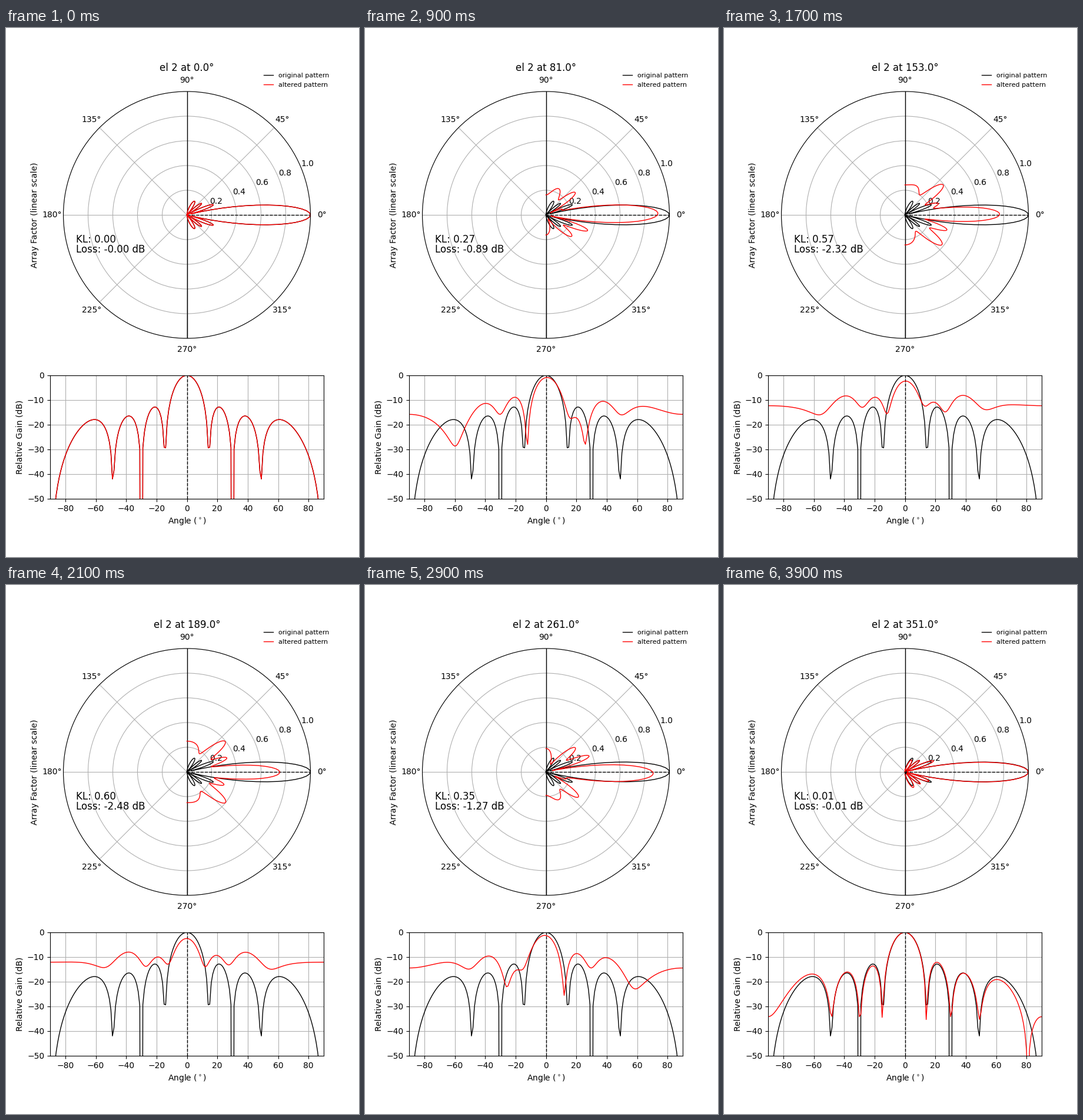
These frames come from a looping animation (600 by 900 pixels, 4 s). A matplotlib script:

```python
import matplotlib.pyplot as plt
import numpy as np
from matplotlib.animation import FuncAnimation

FRAMES = 40
INTERVAL = 100
ELEMENTS = 8
SHIFTED = 2

degrees = np.arange(-90, 91)
theta = np.radians(degrees)


def array_factor(phase):
    """Normalised magnitude of a half-wavelength line array with one shifted element."""
    n = np.arange(ELEMENTS)
    weights = np.ones(ELEMENTS, dtype=complex)
    weights[SHIFTED] = np.exp(1j * phase)
    steering = np.exp(1j * np.pi * np.outer(np.sin(theta), n))
    return np.maximum(np.abs(steering @ weights) / ELEMENTS, 1e-16)


def to_db(magnitude):
    return 20 * np.log10(magnitude)


def divergence(a, b):
    """Kullback-Leibler divergence of two power patterns."""
    p = a**2 / np.sum(a**2)
    q = b**2 / np.sum(b**2)
    return abs(np.sum(p * np.log(p / q)))


base = array_factor(0)

fig = plt.figure(figsize=(6, 9), dpi=100)
grid = fig.add_gridspec(2, 1, height_ratios=[2, 1])
polar = fig.add_subplot(grid[0], projection="polar")
gain = fig.add_subplot(grid[1])

# Polar pattern
for angle, style in ((np.pi / 2, "-"), (-np.pi / 2, "-"), (0, "--")):
    polar.plot([angle, angle], [0, 1], color="black", ls=style, lw=1)
polar_base, = polar.plot(theta, base, color="black", lw=1, label="original pattern")
polar_alt, = polar.plot(theta, base, color="red", lw=1, label="altered pattern")
polar.set_rlim(0, 1)
polar.set_rticks([0.2, 0.4, 0.6, 0.8, 1.0])
polar.set_ylabel("Array Factor (linear scale)", labelpad=30)
polar.legend(handles=[polar_base, polar_alt], loc="upper right",
             bbox_to_anchor=(1.1, 1.1), fontsize=8, handlelength=1.5,
             frameon=False)
title = polar.set_title("")
kl_text = polar.text(0.05, 0.388, "", fontsize=12, transform=polar.transAxes)
loss_text = polar.text(0.05, 0.348, "", fontsize=12, transform=polar.transAxes)

# Gain in decibels
gain.axvline(0, color="black", ls="--", lw=1)
gain.plot(degrees, to_db(base), color="black", lw=1)
gain_alt, = gain.plot(degrees, to_db(base), color="red", lw=1)
gain.set_xlim(-90, 90)
gain.set_ylim(-50, 0)
gain.set_xticks(range(-80, 81, 20))
gain.set_yticks(range(-50, 1, 10))
gain.grid(True)
gain.set_xlabel(r"Angle ($^\circ$)")
gain.set_ylabel("Relative Gain (dB)")


def update(frame):
    phase = frame * 360 / FRAMES
    altered = array_factor(np.radians(phase))
    loss = abs(to_db(altered[degrees == 0][0]))
    polar_alt.set_ydata(altered)
    gain_alt.set_ydata(to_db(altered))
    title.set_text(f"el {SHIFTED} at {phase:.1f}°")
    kl_text.set_text(f"KL: {divergence(base, altered):.2f}")
    loss_text.set_text(f"Loss: -{loss:.2f} dB")
    return polar_alt, gain_alt, title, kl_text, loss_text


anim = FuncAnimation(fig, update, frames=FRAMES, interval=INTERVAL,
                     repeat=True, repeat_delay=0, blit=False)
plt.show()
```
